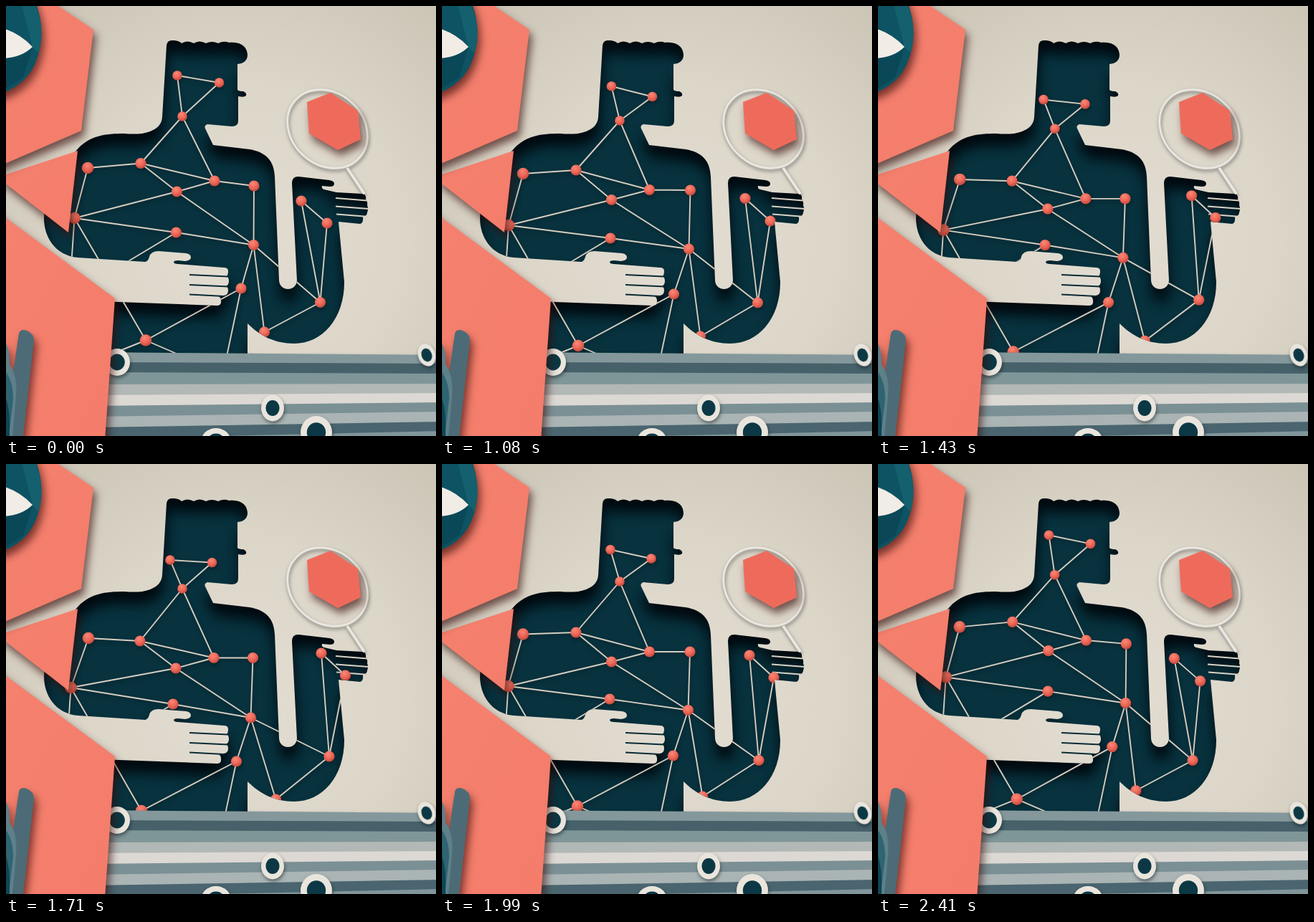
These frames come from a looping animation (600 px wide and 600 px high, 2.48 s). An HTML page:

```html
<!DOCTYPE html>
<html lang="en">
<head>
<meta charset="utf-8">
<title>Paper figure with a network</title>
<style>
  html, body { margin: 0; width: 100%; height: 100%; overflow: hidden; background: #d9d3c6; }
  svg { display: block; width: 100%; height: 100%; }
</style>
</head>
<body>
<svg viewBox="0 0 600 600">
  <defs>
    <path id="body" d="M224 55Q225 47 233 48Q241 48 245 52Q253 47 262 52Q270 47 279 52Q287 48 296 52Q304 48 311 51
      C329 49 337 58 337 69Q336 80 323 81V117Q325 119 331 119Q336 121 335 125Q333 128 324 126V160Q324 168 315 168
      L281 165Q276 167 278 171L289 194L340 200C363 204 374 216 375 238L381 383C382 399 405 399 406 383L399 247
      Q399 238 408 238L451 243Q458 244 458 248Q458 252 452 252L441 251Q440 255 444 256L461 260L497 262
      Q503 263 502 269Q505 273 504 278Q506 283 504 288Q504 293 498 294Q499 303 494 304L464 301L472 385
      C472 437 441 471 402 471C375 471 354 460 337 443V495H130V412L294 418Q301 418 300 411Q300 407 297 405L304 404
      Q310 403 310 397Q310 392 307 391Q311 389 311 384Q311 379 308 377Q310 375 310 370Q310 365 304 365L240 360
      Q234 360 234 357Q235 355 240 355L250 356Q258 355 258 351Q258 346 251 345L213 342Q202 342 200 350Q198 357 194 357
      L100 351C69 348 53 323 53 296C55 260 75 225 97 203C115 180 140 178 165 178Q178 179 190 178Q217 173 218 155Z"/>
    <clipPath id="hole"><use href="#body"/></clipPath>
    <radialGradient id="paper" gradientUnits="userSpaceOnUse" cx="330" cy="330" r="450">
      <stop stop-color="#e3ddd2"/><stop offset=".5" stop-color="#dcd6c9"/><stop offset="1" stop-color="#c9c3b4"/>
    </radialGradient>
    <radialGradient id="bead" cx=".4" cy=".3" r=".75">
      <stop stop-color="#fa8878"/><stop offset=".55" stop-color="#ec6656"/><stop offset="1" stop-color="#b9443a"/>
    </radialGradient>
    <linearGradient id="coral" x2="1" y2="1">
      <stop stop-color="#f5816f"/><stop offset="1" stop-color="#f47c6a"/>
    </linearGradient>
    <filter id="deep" filterUnits="userSpaceOnUse" x="-60" y="-60" width="720" height="720" color-interpolation-filters="sRGB">
      <feDropShadow dx="1" dy="17" stdDeviation="9" flood-color="#00060c" flood-opacity=".95"/>
    </filter>
    <filter id="lift" filterUnits="userSpaceOnUse" x="-60" y="-60" width="720" height="720" color-interpolation-filters="sRGB">
      <feDropShadow dx="4" dy="8" stdDeviation="6" flood-color="#350b08" flood-opacity=".65"/>
    </filter>
    <filter id="soft" filterUnits="userSpaceOnUse" x="-60" y="-60" width="720" height="720" color-interpolation-filters="sRGB">
      <feDropShadow dx="1" dy="3" stdDeviation="2.5" flood-color="#081418" flood-opacity=".5"/>
    </filter>
  </defs>

  <rect width="600" height="600" fill="#07323e"/>
  <g filter="url(#deep)">
    <path id="sheet" fill="url(#paper)" fill-rule="evenodd"/>
    <path d="M460 268L504 271.5M460 279.5L506 283M461 290.5L506 294" stroke="#d9d3c6" stroke-width="1.8"/>
  </g>
  <path d="M256 375L309 377.5M256 389L310 391.5M256 402.500L304 405" stroke="#0a2b35" stroke-width="2"/>

  <g clip-path="url(#hole)">
    <g filter="url(#soft)">
      <path id="threads" fill="none" stroke="#d6cdc0" stroke-width="1.9"/>
      <g id="beads" fill="url(#bead)"></g>
    </g>
  </g>

  <g filter="url(#soft)" fill="none" stroke="#ebe6df">
    <ellipse cx="448.500" cy="171.500" rx="60" ry="50" transform="rotate(42 448.500 171.500)" stroke-width="3"/>
    <path d="M476 226L500 262" stroke-width="4"/>
  </g>
  <path d="M453 121L491 146L495 186L463 201L423 178L420 134Z" fill="#ee6b5c" filter="url(#lift)"/>

  <g id="stripes" filter="url(#soft)"></g>
  <g id="rings" filter="url(#soft)"></g>

  <g fill="url(#coral)">
    <path d="M100 202L-12 239L87 316Z" filter="url(#lift)"/>
    <path d="M-20-20H43L122 33L105 174L-20 228Z" filter="url(#lift)"/>
    <path d="M-20 281L152 408L137 620H-20Z" filter="url(#lift)"/>
  </g>

  <g filter="url(#lift)">
    <path d="M-20-20H34C50 8 53 40 45 68C37 96 20 115-20 127Z" fill="#0e5363"/>
    <path d="M20-10H37C52 20 52 45 45 66L37 57Z" fill="#14606f"/>
    <path d="M-10 78L37 58L24 100L-10 122Z" fill="#0a4858"/>
  </g>
  <path d="M-5 31Q19 38 37 57Q22 72-5 73Z" fill="#f1ede6"/>

  <g filter="url(#lift)">
    <path d="M18 457Q20 450 29 453Q39 457 39 467L23 610H-5Z" fill="#4d6b76"/>
    <path d="M-5 465Q6 475 5 500Q16 515 14 545L8 610H-5Z" fill="#5d8089"/>
    <path d="M-5 505Q10 520 10 548L3 610H-5Z" fill="#2f6472"/>
    <path d="M-5 535Q5 555 5 580V610H-5Z" fill="#0f4656"/>
  </g>
</svg>

<script>
const $ = id => document.getElementById(id);
$('sheet').setAttribute('d', 'M-50-50H650V650H-50Z' + $('body').getAttribute('d'));

// Stripes: left edge, right edge, colour
$('stripes').innerHTML = [
  [483, 487, '#84989b'], [497, 499, '#46616a'], [511, 513, '#7f9698'],
  [528, 527, '#b2b8b6'], [543, 540, '#dcd8d3'], [558, 553, '#7b9095'],
  [573, 566, '#aab4b4'], [588, 580, '#4a656f'], [604, 593, '#80969a']
].map(([l, r, c]) => `<path d="M120 ${l}L610 ${r}V620H120Z" fill="${c}"/>`).join('');

// Rings: centre, outer radii, tilt
$('rings').innerHTML = [
  [155, 497, 18, 19, 0], [587, 487, 12, 16, -20], [372, 561, 16, 18.5, 0],
  [433, 595, 22, 23, 0], [293, 608, 21, 19, 0]
].map(([x, y, rx, ry, tilt]) => `<g transform="translate(${x} ${y}) rotate(${tilt})">
  <ellipse rx="${rx}" ry="${ry}" fill="#e9e5dd"/>
  <ellipse rx="${rx * .6}" ry="${ry * .6}" fill="#0b3844"/></g>`).join('');

// Bead path: x y at each of the four key poses
const KEYS = [0, 5, 7, 11];
const BEADS = [
  [239, 97, 236.5, 112, 235, 119.5, 229, 134],
  [297.5, 107, 293.5, 126.5, 292, 132, 287.5, 137.5],
  [246, 154, 248, 160, 248, 164, 246, 174],
  [114, 226, 113, 234, 113, 237.5, 115, 243],
  [188, 219.5, 187, 229, 187, 235, 187, 247],
  [238.5, 259, 236.5, 270.5, 236.5, 276, 237, 285],
  [291, 244, 289.5, 256.5, 289.5, 262, 290, 270.5],
  [346, 251, 346.5, 257, 346, 262, 344.5, 270.5],
  [95.5, 296, 93, 306, 92.5, 310, 90.5, 312],
  [237.5, 316, 235, 324, 234, 328, 233, 335],
  [345.5, 333.5, 344.5, 339, 343.5, 343.5, 341.5, 354],
  [328, 394, 323.5, 402, 322.5, 407, 321.5, 415],
  [195, 466.5, 190, 474, 189, 477.5, 189, 484],
  [412, 272, 423, 268.5, 429, 267, 440, 264],
  [448, 303, 458, 300, 463, 298, 473.5, 295],
  [438.5, 413.5, 440.5, 414, 442, 413.5, 451, 408],
  [360.5, 455, 360.5, 461, 363.5, 464, 376.5, 468]
];
const LINKS = '0-1 0-2 1-2 2-4 2-6 3-4 3-8 4-6 4-5 5-6 6-7 5-8 8-9 9-10 5-10 7-10 10-11 10-16 10-15 13-14 13-15 14-15 15-16 11-12 8-12'
  .split(' ').map(s => s.split('-'));
// Threads that run out of sight: bead, dx, dy
const LOOSE = [[8, -8, 120], [9, -100, 60], [11, -22, 104], [12, 60, 26], [12, -50, 20]];

const radius = i => i < 3 ? 6.8 : i === 3 || i === 8 || i === 12 ? 8.3 : 7.6;
$('beads').innerHTML = BEADS.map((_, i) => `<circle r="${radius(i)}"/>`).join('');
const circles = [...$('beads').children];

const LOOP = 2480, HOLD = 800, STEP = 70, LAST = 23;

function poseAt(time) {
  if (time < HOLD) return 0;
  const k = Math.floor((time - HOLD) / STEP);
  return Math.min(k + 1, LAST - k + 1, 11.6);
}

function draw(time) {
  const pose = poseAt(time);
  // Cubic through the four key poses
  const weights = KEYS.map(a => KEYS.reduce((w, b) => a === b ? w : w * (pose - b) / (a - b), 1));
  const mix = (bead, axis) => weights.reduce((sum, w, i) => sum + w * bead[2 * i + axis], 0);
  const points = BEADS.map(bead => [mix(bead, 0), mix(bead, 1)]);

  circles.forEach((c, i) => c.setAttribute('transform', `translate(${points[i]})`));
  $('threads').setAttribute('d',
    LINKS.map(([a, b]) => `M${points[a]}L${points[b]}`).join('') +
    LOOSE.map(([a, dx, dy]) => `M${points[a]}l${dx},${dy}`).join(''));
}

const start = performance.now();
let shown = -1;
function tick() {
  const time = (performance.now() - start) % LOOP;
  const pose = poseAt(time);
  if (pose !== shown) draw(time);
  shown = pose;
  requestAnimationFrame(tick);
}
tick();
</script>
</body>
</html>
```
